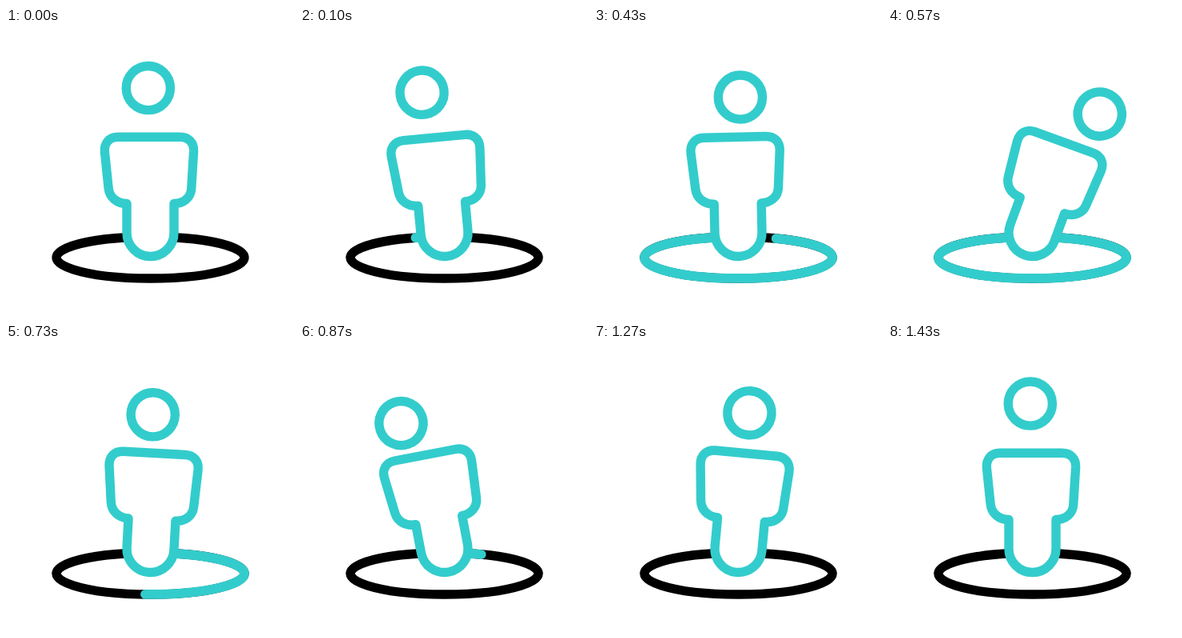
Write an HTML page that moves like this. It is 360x360 px and loops after 1.67 s.

```html
<!DOCTYPE html>
<html lang="en">
<head>
<meta charset="utf-8">
<title>Swaying figure</title>
<style>
  html, body { margin: 0; width: 100%; height: 100%; overflow: hidden; background: #fff; }
  svg { display: block; width: 100%; height: 100%; }
  path, circle { fill: none; stroke: #33cccc; stroke-width: 11.4; stroke-linejoin: round; }
  #ring { stroke: #000; }
  #trail { stroke-width: 11.8; stroke-linecap: round; }
</style>
</head>
<body>
<svg viewBox="0 0 360 360">
  <path id="ring" d="M151 261.8A117.5 26 0 1 0 210 261.8"/>
  <path id="trail" pathLength="1" d="M151 261.8A117.5 26 0 1 0 210 261.8"/>
  <path id="body" d="M151 219.5C139 219.5 129.3 212 128.1 200L123.4 155C122.4 144 129 136.3 140 136.3H217.5C228 136.3 235 143 234.6 154L231.7 201C231 212 222 219.5 210 219.5V256A29.5 29.5 0 0 1 151 256Z"/>
  <circle id="head" cx="181" r="27.6"/>
</svg>
<script>
  const LOOP = 1670, STEP = 33.34, LAST = 43, BEAT = LAST / 5;

  const [trail, body, head] = ['trail', 'body', 'head'].map(id => document.getElementById(id));

  // Progress from step a to step b, eased at both ends.
  function ease(s, a, b) {
    const p = Math.min(1, Math.max(0, (s - a) / (b - a)));
    return p * p * (3 - 2 * p);
  }

  // Eases through one pose per beat.
  function sway(s, ...poses) {
    return poses.reduce((value, pose, i) =>
      value + (pose - poses[i - 1]) * ease(s, (i - 1) * BEAT, i * BEAT));
  }

  function draw(now) {
    const s = Math.min(LAST, Math.floor((now % LOOP + 5) / STEP));

    // The head leads and the body follows a moment later.
    const lean = sway(s - 0.2, 0, -21.5, 20.3, -10.8, 8.2, 0);
    const swing = sway(s, -1, -30, 29.2, -19, 7.8, -1);
    const reach = sway(s, 183, 170.7, 172.2, 168, 165.4, 183.5);
    body.setAttribute('transform', `rotate(${lean} 180.5 256)`);
    head.setAttribute('transform', `rotate(${swing} 181 258)`);
    head.setAttribute('cy', 258 - reach);

    const start = ease(s, 17, 27.2), length = ease(s, 2.1, 14.5) - start;
    trail.style.visibility = length > 0 ? 'visible' : 'hidden';
    trail.setAttribute('stroke-dasharray', `${length} 2`);
    trail.setAttribute('stroke-dashoffset', -start);
  }

  let origin;
  function tick(now) {
    origin ??= now;
    draw(now - origin);
    requestAnimationFrame(tick);
  }
  draw(0);
  requestAnimationFrame(tick);
</script>
</body>
</html>
```
